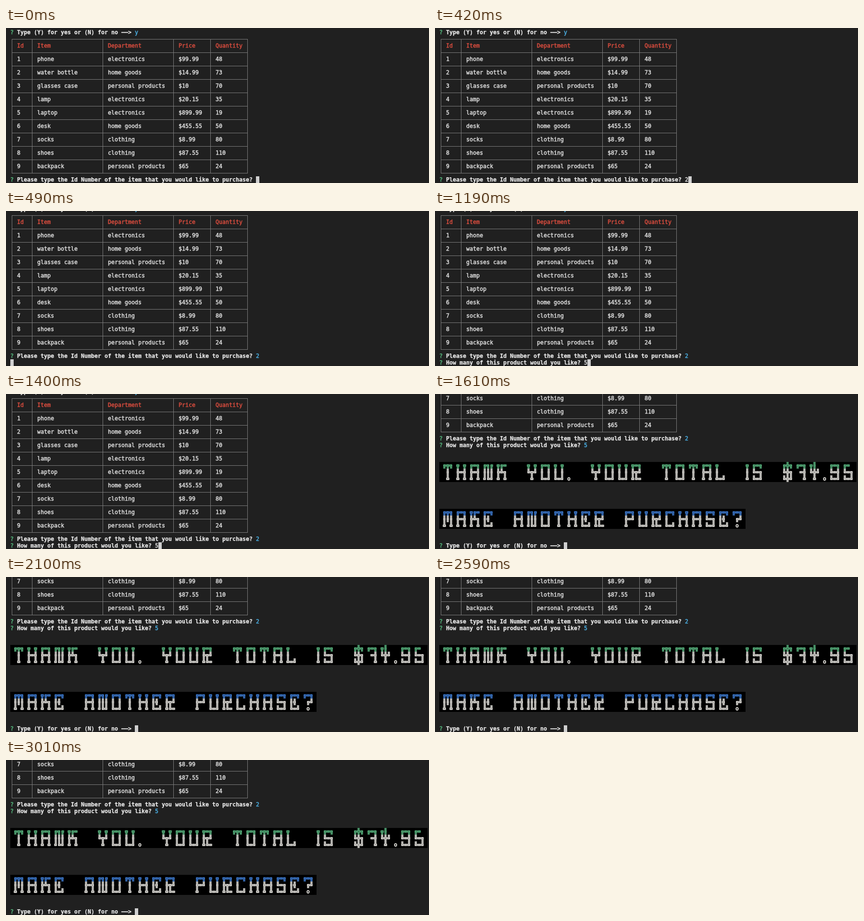
These frames come from a looping animation (880x324 px, 3080 ms). An HTML page with a canvas:

```html
<!DOCTYPE html>
<html lang="en">
<head>
<meta charset="utf-8">
<title>Store prompt</title>
<style>
  html, body { margin: 0; width: 100%; height: 100%; overflow: hidden; background: #202020; }
  canvas { display: block; }
</style>
</head>
<body>
<canvas id="term" width="880" height="324"></canvas>
<script>
const ctx = document.getElementById('term').getContext('2d');
const LOOP = 3080, CW = 7, CH = 14, LEFT = 9, TOP = 2;
const FACE = '11.63px "DejaVu Sans Mono", "Liberation Mono", monospace';
const INK = {
  bg: '#202020', text: '#dcdcdc', bright: '#e8e8e8', line: '#7c7c7c',
  red: '#d84c3e', green: '#57bd80', cyan: '#4aaee2'
};
// Banner colours: stroke, then the gap inside the double line
const GREEN = ['#5cbc84', '#2c5c40'];
const BLUE = ['#3f7fd8', '#203f6c'];
const WHITE = ['#e8e6e1', '#7c7b78'];

const COLS = [2, 8, 29, 50, 61];
const RULES = [0, 6, 27, 48, 59, 70];
const ITEMS = [
  'Id|Item|Department|Price|Quantity',
  '1|phone|electronics|$99.99|48',
  '2|water bottle|home goods|$14.99|73',
  '3|glasses case|personal products|$10|70',
  '4|lamp|electronics|$20.15|35',
  '5|laptop|electronics|$899.99|19',
  '6|desk|home goods|$455.55|50',
  '7|socks|clothing|$8.99|80',
  '8|shoes|clothing|$87.55|110',
  '9|backpack|personal products|$65|24'
].map(s => s.split('|'));

const ASK_ID = 'Please type the Id Number of the item that you would like to purchase?';
const ASK_COUNT = 'How many of this product would you like?';
const ASK_AGAIN = 'Type (Y) for yes or (N) for no \u2014\u2014>';

// Three-row letters made of double box lines
const GLYPHS = {
  A: '╔═╗,╠═╣,╩ ╩', C: '╔═╗,║  ,╚═╝', E: '╔═╗,║╣ ,╚═╝', H: '╦ ╦,╠═╣,╩ ╩',
  I: '╦,║,╩', K: '╦╔═,╠╩╗,╩ ╩', L: '╦  ,║  ,╩═╝', M: '╔╦╗,║║║,╩ ╩',
  N: '╔╗╔,║║║,╝╚╝', O: '╔═╗,║ ║,╚═╝', P: '╔═╗,╠═╝,╩  ', R: '╦═╗,╠╦╝,╩╚═',
  S: '╔═╗,╚═╗,╚═╝', T: '╔╦╗, ║ , ╩ ', U: '╦ ╦,║ ║,╚═╝', Y: '╦ ╦,╚╦╝, ╩ ',
  4: '╦║ ,╚╬╝, ╩ ', 5: '╔═ ,╚═╗,╚═╝', 7: '╔═╗, ═╣,  ╩', 9: '╔═╗,╚═╣,╚═╝',
  $: '╔╬╗,╚╬╗,╚╬╝', '?': '╔═╗, ╔╝, o ', '.': ' , ,o', ' ': '    ,    ,    '
};
const ARMS = {
  '═': 'lr', '║': 'ud', '╔': 'dr', '╗': 'dl', '╚': 'ur', '╝': 'ul',
  '╠': 'udr', '╣': 'udl', '╦': 'dlr', '╩': 'ulr', '╬': 'udlr'
};

function bannerRows(words) {
  return [0, 1, 2].map(r =>
    ' ' + [...words].map(c => GLYPHS[c].split(',')[r]).join(' ') + ' ');
}
const TOTAL = bannerRows('THANK YOU. YOUR TOTAL IS $74.95');
const AGAIN = bannerRows('MAKE ANOTHER PURCHASE?');

// at: ms, shift: rows scrolled, last: lowest row printed, cur: cursor column and row
const STEPS = [
  { at: 0, shift: 0, last: 22, cur: [73, 22] },
  { at: 210, shift: 0, last: 22, cur: [74, 22], id: 'text' },
  { at: 490, shift: 1, last: 22, cur: [0, 23], id: 'cyan' },
  { at: 560, shift: 1, last: 23, cur: [43, 23], id: 'cyan' },
  { at: 1050, shift: 1, last: 23, cur: [44, 23], id: 'cyan', count: 'text' },
  { at: 1470, shift: 2, last: 23, cur: [0, 24], id: 'cyan', count: 'cyan' },
  { at: 1540, shift: 6, last: 28, cur: [4, 28], id: 'cyan', count: 'cyan', cut: 4 },
  { at: 1610, shift: 16, last: 38, cur: [37, 38], id: 'cyan', count: 'cyan' }
];

let shift = 0;
const px = col => LEFT + col * CW;
const py = row => TOP + (row - shift) * CH;

function box(color, x, y, w, h) {
  ctx.fillStyle = color;
  ctx.fillRect(x, y, w, h);
}

function print(str, col, row, color, bold) {
  ctx.font = (bold ? 'bold ' : '') + FACE;
  ctx.fillStyle = ctx.strokeStyle = color;
  ctx.lineWidth = bold ? 0.25 : 0.5;
  [...str].forEach((c, i) => {
    if (c === ' ') return;
    ctx.fillText(c, px(col + i), py(row) + 11);
    ctx.strokeText(c, px(col + i), py(row) + 11);
  });
}

function prompt(row, question, answer, color) {
  print('?', 0, row, INK.green);
  print(question, 2, row, INK.bright, true);
  if (color) print(answer, question.length + 3, row, INK[color]);
}

function table(row) {
  const x0 = px(0) + 3, y0 = py(row) + 7, w = 70 * CW, h = 20 * CH;
  for (let i = 0; i <= 10; i++) box(INK.line, x0, y0 + i * 2 * CH, w + 1, 1);
  RULES.forEach(c => box(INK.line, px(c) + 3, y0, 1, h));
  ITEMS.forEach((cells, r) => cells.forEach((s, i) =>
    print(s, COLS[i], row + 1 + r * 2, r ? INK.text : INK.red)));
}

function arms(dirs, x, y, half, color) {
  const cx = x + 3.5, cy = y + 7.5, t = half * 2;
  for (const d of dirs) {
    if (d === 'l') box(color, x, cy - half, 3.5 + half, t);
    if (d === 'r') box(color, cx - half, cy - half, 3.5 + half, t);
    if (d === 'u') box(color, cx - half, y, t, 7.5 + half);
    if (d === 'd') box(color, cx - half, cy - half, t, 6.5 + half);
  }
}

function banner(rows, top, topInk, cut) {
  const lines = rows.map((s, r) => r === 2 && cut ? s.slice(0, cut) : s);
  lines.forEach((s, r) => box('#000', LEFT, py(top + r), s.length * CW, CH));
  [2, 0.5].forEach((half, pass) => lines.forEach((s, r) => {
    const color = (r ? WHITE : topInk)[pass];
    [...s].forEach((c, i) => {
      if (ARMS[c]) arms(ARMS[c], px(i), py(top + r), half, color);
      else if (c === 'o' && !pass) print(c, i, top + r, color, true);
    });
  }));
}

function draw(now) {
  const t = now % LOOP;
  const s = STEPS.filter(step => step.at <= t).pop();
  shift = s.shift;
  box(INK.bg, 0, 0, 880, 324);
  prompt(0, ASK_AGAIN, 'y', 'cyan');
  table(1);
  prompt(22, ASK_ID, '2', s.id);
  if (s.last >= 23) prompt(23, ASK_COUNT, '5', s.count);
  if (s.last >= 28) banner(TOTAL, 26, GREEN, s.cut);
  if (s.last >= 38) {
    banner(AGAIN, 33, BLUE);
    prompt(38, ASK_AGAIN);
  }
  box('#d0d0d0', px(s.cur[0]), py(s.cur[1]), CW, CH);
}

const start = performance.now();
function tick() {
  draw(performance.now() - start);
  requestAnimationFrame(tick);
}
tick();
</script>
</body>
</html>
```
